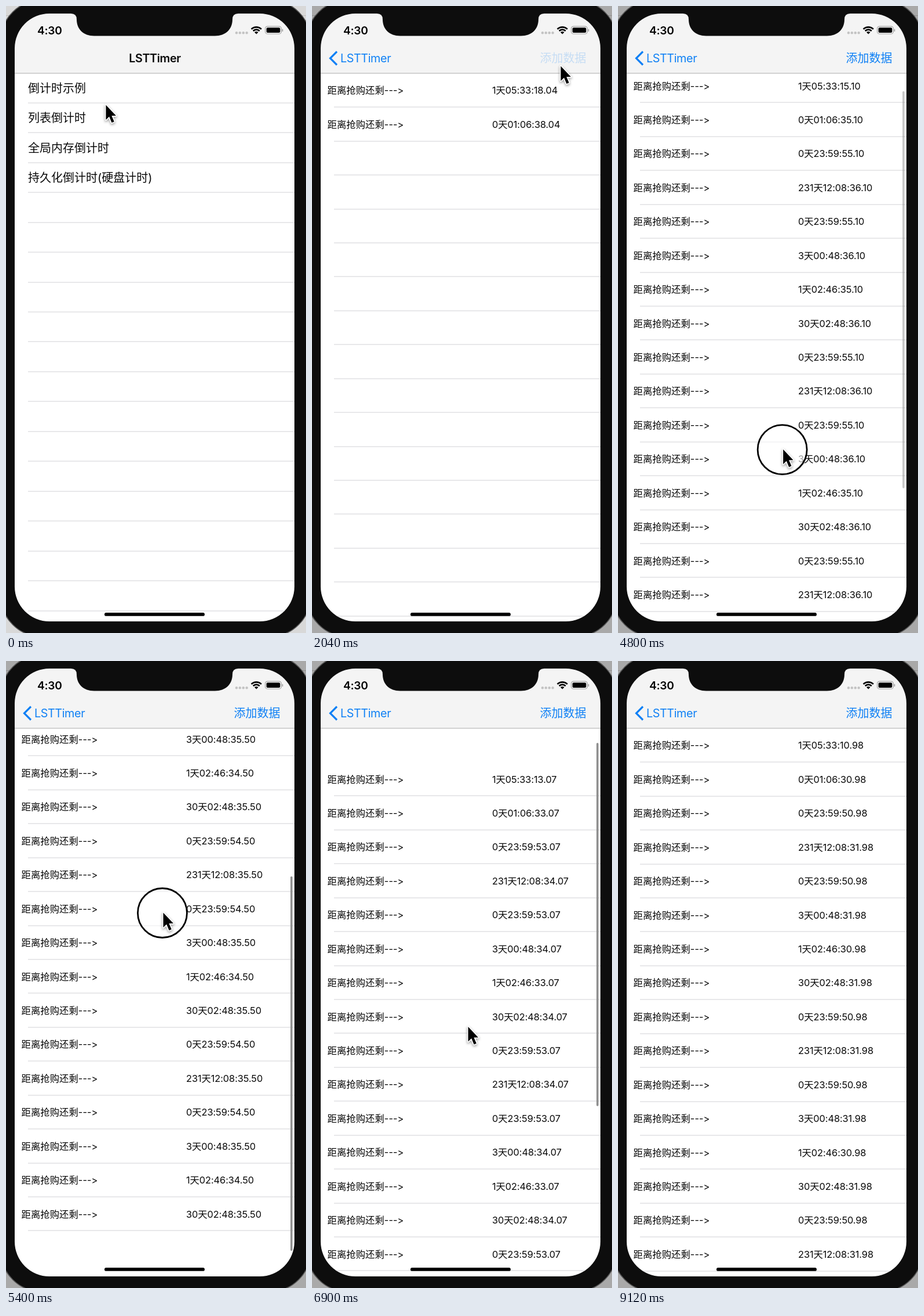
Write an HTML page with a canvas that moves like this. It is 518 px wide and 1080 px high and loops after 9180 ms.

```html
<!DOCTYPE html>
<html lang="zh-CN">
<head>
<meta charset="utf-8">
<title>LSTTimer</title>
<style>
html, body { margin: 0; width: 100%; height: 100%; overflow: hidden; background: #0d0d0d; }
canvas { display: block; width: 518px; height: 1080px; }
</style>
</head>
<body>
<canvas id="stage" width="518" height="1080"></canvas>
<script>
const ctx = document.getElementById('stage').getContext('2d');
const LOOP = 9180, STEP = 60;
const FONT = 'Inter, "Noto Sans CJK SC", "Noto Sans CJK", sans-serif';
const BLUE = '#0f80f5', LINE = '#dadadc';
const LEFT = 15, RIGHT = 498, TOP = 13, BOTTOM = 1060, WIDTH = RIGHT - LEFT;
const NAV_END = 115.8, ROW = 58.43, MENU_ROW = 51.46;
const VIEW = 1020.3 - NAV_END, MAX_SCROLL = 20 * ROW - VIEW;

const CLICK = 180, PUSH_START = 300, PUSH_TIME = 540;
const ADDS = [2100, 2640, 4080];
const DRAG_UP = [4740, 5460], DRAG_DOWN = [6360, 6840];

const MENU = ['倒计时示例', '列表倒计时', '全局内存倒计时', '持久化倒计时(硬盘计时)'];

// Shared seconds counter, which every row adds to its own base
const CLOCK = [[0, 20.08], [2040, 18.04], [3660, 16.24], [5400, 14.5],
  [6300, 13.63], [7500, 12.5], [9120, 10.98], [9180, 10.92]];

const span = (d, h, m, s) => ((d * 24 + h) * 60 + m) * 60 + s;
const FIRST = [span(1, 5, 33, 0), span(0, 1, 6, 20)];
const ADDED = [span(0, 23, 59, 40), span(231, 12, 8, 21), span(0, 23, 59, 40),
  span(3, 0, 48, 21), span(1, 2, 46, 20), span(30, 2, 48, 21)];

// Pointer path: time, x, y
const POINTER = [[0, 172, 170], [180, 176, 188], [900, 176, 188], [1740, 429, 103],
  [4140, 429, 103], [4680, 285, 771], [4740, 285, 771], [5400, 271, 433],
  [5520, 270, 425], [6240, 249, 217], [6360, 249, 217], [6840, 268, 620],
  [7500, 315, 1025], [7740, 322, 1110]];

const clamp = (v, a = 0, b = 1) => Math.min(b, Math.max(a, v));
const mix = (a, b, p) => a + (b - a) * p;
const smooth = p => p * p * (3 - 2 * p);
const easeOut = p => 1 - (1 - p) ** 3;
const within = (t, [a, b]) => t >= a && t < b;

function track(keys, t, col, ease = p => p) {
  if (t <= keys[0][0]) return keys[0][col];
  for (let i = 1; i < keys.length; i++) {
    const a = keys[i - 1], b = keys[i];
    if (t <= b[0]) return mix(a[col], b[col], ease((t - a[0]) / (b[0] - a[0])));
  }
  return keys[keys.length - 1][col];
}

const pointerX = t => track(POINTER, t, 1, smooth);
const pointerY = t => track(POINTER, t, 2, smooth);

const rubber = x => (1 - 1 / (x * 0.55 / VIEW + 1)) * VIEW;
function resist(y) {
  if (y < 0) return -rubber(-y);
  return y > MAX_SCROLL ? MAX_SCROLL + rubber(y - MAX_SCROLL) : y;
}
const settle = (from, to, dt) => to + (from - to) * (1 + dt / 80) * Math.exp(-dt / 80);

function dragScroll(t, start, base) {
  return resist(base + pointerY(start) - pointerY(t));
}

function scrollAt(t) {
  const [u0, u1] = DRAG_UP, [d0, d1] = DRAG_DOWN;
  if (t < u0) return 0;
  if (t < u1) return dragScroll(t, u0, 0);
  if (t < d0) return settle(dragScroll(u1, u0, 0), MAX_SCROLL, t - u1);
  if (t < d1) return dragScroll(t, d0, MAX_SCROLL);
  return settle(dragScroll(d1, d0, MAX_SCROLL), 0, t - d1);
}

function text(str, x, cy, size, { color = '#0a0a0a', weight = 400, gap = 0, align = 'left' } = {}) {
  ctx.font = `${weight} ${size}px ${FONT}`;
  ctx.letterSpacing = gap + 'px';
  ctx.textAlign = align;
  ctx.fillStyle = color;
  ctx.fillText(str, x, cy + size * 0.37);
  return ctx.measureText(str).width;
}

function box(x, y, w, h, r, color) {
  ctx.beginPath();
  ctx.roundRect(x, y, w, h, r);
  ctx.fillStyle = color;
  ctx.fill();
}

function rule(x, y, color = LINE) {
  ctx.fillStyle = color;
  ctx.fillRect(x, Math.round(y) - 0.6, RIGHT - x, 1.2);
}

function stroke(points, width, color) {
  ctx.beginPath();
  points.forEach(([x, y]) => ctx.lineTo(x, y));
  ctx.lineWidth = width;
  ctx.strokeStyle = color;
  ctx.stroke();
}

function countdown(total) {
  const cs = Math.round(total * 100), sec = Math.floor(cs / 100);
  const two = n => String(n).padStart(2, '0');
  const parts = [Math.floor(sec / 3600) % 24, Math.floor(sec / 60) % 60, sec % 60];
  return `${Math.floor(sec / 86400)}天${parts.map(two).join(':')}.${two(cs % 100)}`;
}

function drawMenu(t) {
  ctx.fillStyle = '#fff';
  ctx.fillRect(LEFT, NAV_END, WIDTH, BOTTOM - NAV_END);
  if (t >= CLICK) {
    ctx.fillStyle = '#d9d9d9';
    ctx.fillRect(LEFT, NAV_END + MENU_ROW - 0.5, WIDTH, MENU_ROW);
  }
  for (let i = 0; i < 18; i++) {
    const y = NAV_END - 0.5 + MENU_ROW * i;
    if (MENU[i]) text(MENU[i], 38, y + MENU_ROW / 2 + 0.4, 20);
    rule(38, y + MENU_ROW);
  }
}

function drawRows(t) {
  ctx.fillStyle = '#fff';
  ctx.fillRect(LEFT, NAV_END, WIDTH, BOTTOM - NAV_END);
  const batches = ADDS.filter(a => t >= a).length;
  const count = 2 + 6 * batches;
  const now = track(CLOCK, t, 1), top = NAV_END - scrollAt(t);
  for (let i = 0; i < Math.max(count, 16); i++) {
    const y = top + ROW * i;
    if (y + ROW < NAV_END - 2 || y > BOTTOM) continue;
    if (i < count) {
      const cy = y + ROW / 2 + 0.3;
      let x = 26.5;
      // Drawn one sign at a time so the font does not join them into an arrow
      for (const part of ['距离抢购还剩', '-', '-', '-', '>']) x += text(part, x, cy, 16.4);
      const base = i < 2 ? FIRST[i] : ADDED[(i - 2) % 6];
      text(countdown(base + now), 311, cy, 16.4, { gap: -0.1 });
    }
    rule(38, y + ROW);
  }
  drawScrollBar(t);
}

function drawScrollBar(t) {
  const alpha = clamp((t - DRAG_UP[0]) / 120) * clamp((7860 - t) / 300);
  if (!alpha) return;
  const scroll = scrollAt(t), start = 141, end = 1016, full = 684;
  const over = Math.max(0, -scroll, scroll - MAX_SCROLL);
  const h = full - over;
  const y = start + (end - start - h) * clamp(scroll / MAX_SCROLL);
  ctx.globalAlpha = alpha;
  box(491.2, y, 3.4, h, 1.7, '#8b8b8b');
  ctx.globalAlpha = 1;
}

function drawPages(t, push) {
  ctx.save();
  ctx.beginPath();
  ctx.rect(LEFT, NAV_END, WIDTH, BOTTOM - NAV_END);
  ctx.clip();
  if (push < 1) {
    ctx.save();
    ctx.translate(-0.3 * WIDTH * push, 0);
    drawMenu(t);
    ctx.restore();
    ctx.fillStyle = `rgba(0,0,0,${0.1 * push})`;
    ctx.fillRect(LEFT, NAV_END, WIDTH, BOTTOM);
  }
  if (push > 0) {
    ctx.translate(WIDTH * (1 - push), 0);
    drawRows(t);
  }
  ctx.restore();
}

function addAlpha(t) {
  for (const a of ADDS) {
    if (t >= a - 120 && t < a) return 0.2;
    if (t >= a && t < a + 240) return mix(0.2, 1, (t - a) / 240);
  }
  return 1;
}

function drawNav(t, push) {
  ctx.fillStyle = '#f4f4f4';
  ctx.fillRect(LEFT, TOP, WIDTH, NAV_END - TOP);
  ctx.fillStyle = '#c9c9c9';
  ctx.fillRect(LEFT, 115.4, WIDTH, 1.2);

  if (push < 1) {
    ctx.globalAlpha = 1 - push;
    text('LSTTimer', mix(257, 93, push), 90, 19.8, { weight: 600, gap: -0.4, align: 'center' });
  }
  if (push > 0) {
    ctx.globalAlpha = push;
    text('LSTTimer', mix(212, 49, push), 90, 19.8, { color: BLUE, gap: -0.4 });
    stroke([[43, 78.5], [31.5, 90], [43, 101.5]], 3.2, BLUE);
    ctx.globalAlpha = push * addAlpha(t);
    text('添加数据', 393.5, 90, 20, { color: BLUE });
  }
  ctx.globalAlpha = 1;
}

function drawStatus() {
  text('4:30', 54, 42, 19.2, { weight: 600, gap: -0.3, color: '#000' });
  for (let i = 0; i < 4; i++) box(395.8 + i * 5.9, 44, 4.4, 4.4, 2.2, '#c3c3c3');

  const cx = 432.3, cy = 48.5, a = Math.PI * 0.25;
  ctx.strokeStyle = '#000';
  ctx.lineWidth = 2.7;
  for (const r of [12.2, 7.8]) {
    ctx.beginPath();
    ctx.arc(cx, cy, r, -Math.PI / 2 - a, -Math.PI / 2 + a);
    ctx.stroke();
  }
  ctx.beginPath();
  ctx.moveTo(cx, cy);
  ctx.arc(cx, cy, 4.6, -Math.PI / 2 - a, -Math.PI / 2 + a);
  ctx.fillStyle = '#000';
  ctx.fill();

  ctx.beginPath();
  ctx.roundRect(447.7, 35.2, 27.6, 12.8, 3.6);
  ctx.lineWidth = 1.2;
  ctx.strokeStyle = '#a2a2a2';
  ctx.stroke();
  box(449.7, 37.2, 23.6, 8.8, 2, '#000');
  box(476.6, 39.6, 1.7, 4.4, 0.9, '#a2a2a2');
}

function screenPath() {
  const r = 60;
  ctx.beginPath();
  ctx.moveTo(LEFT + r, TOP);
  ctx.lineTo(112, TOP);
  ctx.quadraticCurveTo(122, TOP, 122, 23);
  ctx.bezierCurveTo(122, 40, 134, 51.5, 152, 51.5);
  ctx.lineTo(361, 51.5);
  ctx.bezierCurveTo(379, 51.5, 391, 40, 391, 23);
  ctx.quadraticCurveTo(391, TOP, 401, TOP);
  ctx.arcTo(RIGHT, TOP, RIGHT, TOP + r, r);
  ctx.arcTo(RIGHT, BOTTOM, RIGHT - r, BOTTOM, r);
  ctx.arcTo(LEFT, BOTTOM, LEFT, BOTTOM - r, r);
  ctx.arcTo(LEFT, TOP, LEFT + r, TOP, r);
  ctx.closePath();
}

function drawCase(t) {
  const lit = t < CLICK;
  ctx.fillStyle = lit ? '#d8d8d8' : '#a9a9a9';
  ctx.fillRect(0, 0, 518, 1080);
  ctx.fillStyle = lit ? '#bdbdbd' : '#8e8e8e';
  ctx.fillRect(0, 16, 518, 1);
  box(-9, -10, 535, 1096, 70, '#0d0d0d');
  ctx.lineWidth = 1.6;
  ctx.strokeStyle = '#555';
  ctx.stroke();
}

function drawPointer(t) {
  const x = pointerX(t), y = pointerY(t);
  if (y > 1100) return;
  if (within(t, DRAG_UP) || within(t, DRAG_DOWN)) {
    ctx.beginPath();
    ctx.arc(x - 1, y + 1, 42.5, 0, Math.PI * 2);
    ctx.fillStyle = 'rgba(255,255,255,0.6)';
    ctx.fill();
    ctx.lineWidth = 2.8;
    ctx.strokeStyle = '#000';
    ctx.stroke();
  }
  ctx.save();
  ctx.translate(x, y);
  ctx.beginPath();
  [[0.5, 0.5], [0.5, 26], [6.2, 20.6], [10.6, 31], [14.8, 29.2], [10.4, 19], [18, 19]]
    .forEach(([px, py]) => ctx.lineTo(px, py));
  ctx.closePath();
  ctx.lineJoin = 'round';
  ctx.lineWidth = 3.4;
  ctx.strokeStyle = '#fff';
  ctx.shadowColor = 'rgba(0,0,0,0.4)';
  ctx.shadowBlur = 4;
  ctx.shadowOffsetY = 2;
  ctx.stroke();
  ctx.shadowColor = 'transparent';
  ctx.fillStyle = '#000';
  ctx.fill();
  ctx.restore();
}

function draw(t) {
  const push = easeOut(clamp((t - PUSH_START) / PUSH_TIME));
  drawCase(t);
  ctx.save();
  screenPath();
  ctx.clip();
  drawPages(t, push);
  drawNav(t, push);
  drawStatus();
  box(170, 1045, 173, 5.8, 2.9, '#000');
  ctx.restore();
  drawPointer(t);
}

function tick() {
  draw(Math.floor(performance.now() % LOOP / STEP) * STEP);
  requestAnimationFrame(tick);
}
tick();
</script>
</body>
</html>
```
